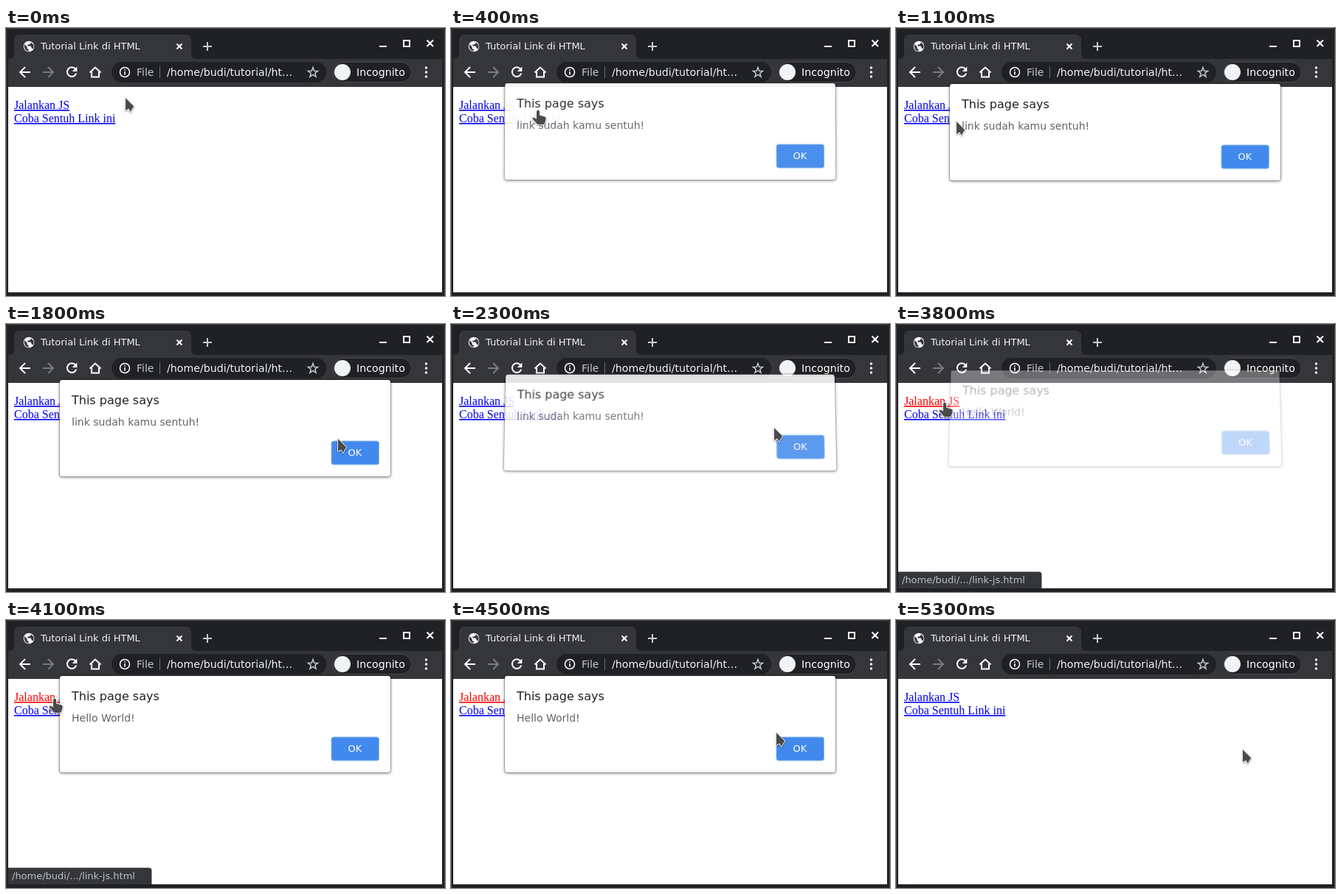
An HTML page for the animation above (5700 ms loop, 595 px wide and 364 px high).

```html
<!DOCTYPE html>
<html lang="id">
<head>
<meta charset="utf-8">
<title>Tutorial Link di HTML</title>
<style>
html, body { margin: 0; width: 100%; height: 100%; overflow: hidden; background: #202124; }
svg { display: block; position: absolute; left: 0; top: 0; }
text { font-family: "DejaVu Sans", sans-serif; white-space: pre; }
.link { font: 16px "Liberation Serif", serif; fill: #00e; text-decoration: underline; }
.line { fill: none; stroke: #fff; stroke-width: 2; }
#dialog {
  position: absolute; left: 73px; top: 76px; width: 448px; height: 131px;
  background: #fff; border-radius: 3px;
  box-shadow: 0 0 0 1px rgba(0,0,0,.22), 0 1px 4px rgba(0,0,0,.5);
}
#pointer { filter: drop-shadow(0 1px 1px rgba(0,0,0,.4)); }
#pointer path { fill: #4a4a4a; stroke: #fff; stroke-width: 1.6; paint-order: stroke; stroke-linejoin: round; }
</style>
</head>
<body>
<svg width="595" height="364" viewBox="0 0 595 364">
  <rect width="595" height="364" fill="#202124"/>
  <path d="M.5 364V6Q.5 .5 6 .5H589Q594.5 .5 594.5 6V364" fill="none" stroke="#45474a"/>
  <path d="M3 42Q11 42 11 34V17Q11 9 19 9H243Q251 9 251 17V34Q251 42 259 42H591V80H3Z" fill="#35363a"/>
  <rect x="3" y="80" width="588" height="279" fill="#fff"/>

  <circle cx="31" cy="25" r="7.3" fill="#f1f3f4"/>
  <path d="M25 22L28.5 25.5V28L30.5 29V31.5Q25 30.5 24.8 25ZM31.5 18.8L33.5 19.5V21L31.5 22.5H29.5V24.5H33.5L35 27.5L36.5 28.5Q38 26 37.3 23L34.5 20Z" fill="#35363a"/>
  <text x="47" y="29" font-size="13" fill="#f1f3f4">Tutorial Link di HTML</text>
  <path class="line" stroke-width="1.7" d="M231.5 21.5L238.5 28.5M238.5 21.5L231.5 28.5"/>
  <path class="line" style="stroke:#c8cacd" d="M267 25H279M273 19V31"/>
  <path class="line" d="M506 25H516M539 17H547V25H539ZM570.5 16.5L579 25M579 16.5L570.5 25"/>

  <path class="line" id="back" d="M33 60H19.5M26 53L19 60L26 67"/>
  <path class="line" style="stroke:#7b7c7f" d="M50 60H63.5M57 53L64 60L57 67"/>
  <path class="line" d="M94 55.6A6.3 6.3 0 1 0 95.2 61.5"/>
  <path d="M96.3 52.5V59H89.8Z" fill="#fff"/>
  <path class="line" d="M113.5 60.5L121 53.5L128.5 60.5M116 59V66.5H126V59"/>

  <rect x="143" y="46" width="291" height="28" rx="14" fill="#202124"/>
  <circle class="line" cx="161" cy="60" r="6.5" style="stroke-width:1.5"/>
  <path class="line" style="stroke-width:1.6" d="M161 59V63.5M161 56.2V57.8"/>
  <text x="177" y="65" font-size="14" fill="#c4c7ca">File</text>
  <path d="M208.5 52V68" stroke="#6b6e72"/>
  <text x="218" y="65" font-size="14.2" fill="#f1f3f4">/home/budi/tutorial/ht…</text>
  <path id="star" class="line" style="stroke:#c4c7ca;stroke-width:1.5"/>
  <rect x="444" y="46.5" width="105.500" height="27" rx="13.500" fill="#202124" stroke="#46484c"/>
  <circle cx="456" cy="60" r="11" fill="#f1f3f4"/>
  <text x="475" y="65" font-size="14.2" fill="#fff">Incognito</text>
  <path d="M569.500 54h.01M569.500 60h.01M569.500 66h.01" stroke="#fff" stroke-width="3.4" stroke-linecap="round"/>

  <text id="first" class="link" x="11" y="110">Jalankan JS</text>
  <text class="link" x="11" y="128">Coba Sentuh Link ini</text>

  <g id="status">
    <path d="M3 336.500H193.500Q197.500 336.500 197.500 340.500V359H3Z" fill="#35363a"/>
    <text x="8" y="352" font-size="13" fill="#bdc1c6">/home/budi/.../link-js.html</text>
  </g>
</svg>

<div id="dialog">
  <svg width="448" height="131" viewBox="73 76 448 131">
    <text x="89" y="109" font-size="16" fill="#202124">This page says</text>
    <text id="message" x="89" y="138" font-size="14" fill="#5f6368"></text>
    <rect x="441" y="159" width="64.500" height="32" rx="3" fill="#4189ec" stroke="#8db9f5"/>
    <text x="473" y="179" font-size="13" fill="#fff" text-anchor="middle">OK</text>
  </svg>
</div>

<svg width="595" height="364" viewBox="0 0 595 364">
  <g id="pointer"><path id="shape"/></g>
</svg>

<script>
const $ = id => document.getElementById(id);
const LOOP = 5700, STEP = 100;
const ARROW = "M0 0V17L4.200 14.500L7 19L9 14.500L11.500 11.500Z";
const HAND = "M8 .5Q10 .5 10 3V7.500L17 9.500Q19.200 10.200 18.700 12.500L17.200 18Q16.700 20 14.500 20H9Q7 20 6 18.500L.8 12.500Q0 10.500 2.200 10.500L6 12.500V3Q6 .5 8 .5Z";

// [time, x, y, shape], each held until the next
const pointer = [
  [0, 162, 95, ARROW], [200, 110, 111, HAND],
  [1100, 82, 127, ARROW], [1200, 132, 124, ARROW], [1300, 212, 121, ARROW],
  [1400, 300, 121, ARROW], [1500, 380, 123, ARROW], [1600, 423, 127, ARROW],
  [1700, 438, 142, ARROW], [1800, 450, 156, ARROW], [1900, 457, 167, ARROW],
  [2000, 459, 171, ARROW], [2200, 450, 162, ARROW], [2300, 438, 141, ARROW],
  [2400, 400, 112, ARROW], [2700, 290, 100, ARROW], [2800, 180, 98, ARROW],
  [2900, 100, 104, ARROW], [3000, 62, 112, HAND], [3200, 62, 110, HAND],
  [3300, 61, 107, HAND], [3600, 58, 106, HAND],
  [4200, 82, 110, ARROW], [4300, 170, 117, ARROW], [4400, 330, 136, ARROW],
  [4500, 441, 153, ARROW], [4600, 454, 163, ARROW], [4700, 460, 168, ARROW],
  [4900, 462, 171, ARROW], [5000, 466, 174, ARROW], [5100, 470, 176, ARROW]
];

// [time, opacity, lift, tilt]
const opening = t => [[t, .34, -13.700, 6], [t + 100, .75, -5, 3], [t + 200, .95, -1, 1], [t + 300, 1, 0, 0]];
const closing = (t, end) => [[t, .86, -8, 5], [t + 100, .05, -18, 7], [end, 0, 0, 0]];
const dialog = [[0, 0, 0, 0], ...opening(200), ...closing(2300, 2700), ...opening(3800), ...closing(5000, 5300)];

const status = [[0, 0], [3200, .47], [3300, 1], [4300, .47], [4400, 0]];

const held = (track, t) => track.findLast(key => key[0] <= t);

function draw(t) {
  const [, x, y, shape] = held(pointer, t);
  $("shape").setAttribute("d", shape);
  $("pointer").setAttribute("transform", `translate(${x} ${y})`);

  const [, opacity, lift, tilt] = held(dialog, t);
  const box = $("dialog").style;
  box.opacity = opacity;
  box.transform = tilt ? `translateY(${lift}px) perspective(1000px) rotateX(${tilt}deg)` : "none";
  $("message").textContent = t < 3000 ? "link sudah kamu sentuh!" : "Hello World!";

  $("status").style.opacity = held(status, t)[1];
  $("first").style.fill = t >= 3600 && t < 5000 ? "#f00" : "#00e";
}

const star = Array.from({ length: 10 }, (_, i) => {
  const a = i * Math.PI / 5, r = i % 2 ? 2.900 : 7;
  return `${416 + r * Math.sin(a)} ${60.500 - r * Math.cos(a)}`;
});
$("star").setAttribute("d", `M${star.join("L")}Z`);

const start = performance.now();
function tick() {
  const t = (performance.now() - start) % LOOP;
  draw(Math.floor(t / STEP) * STEP);
  requestAnimationFrame(tick);
}
tick();
</script>
</body>
</html>
```
